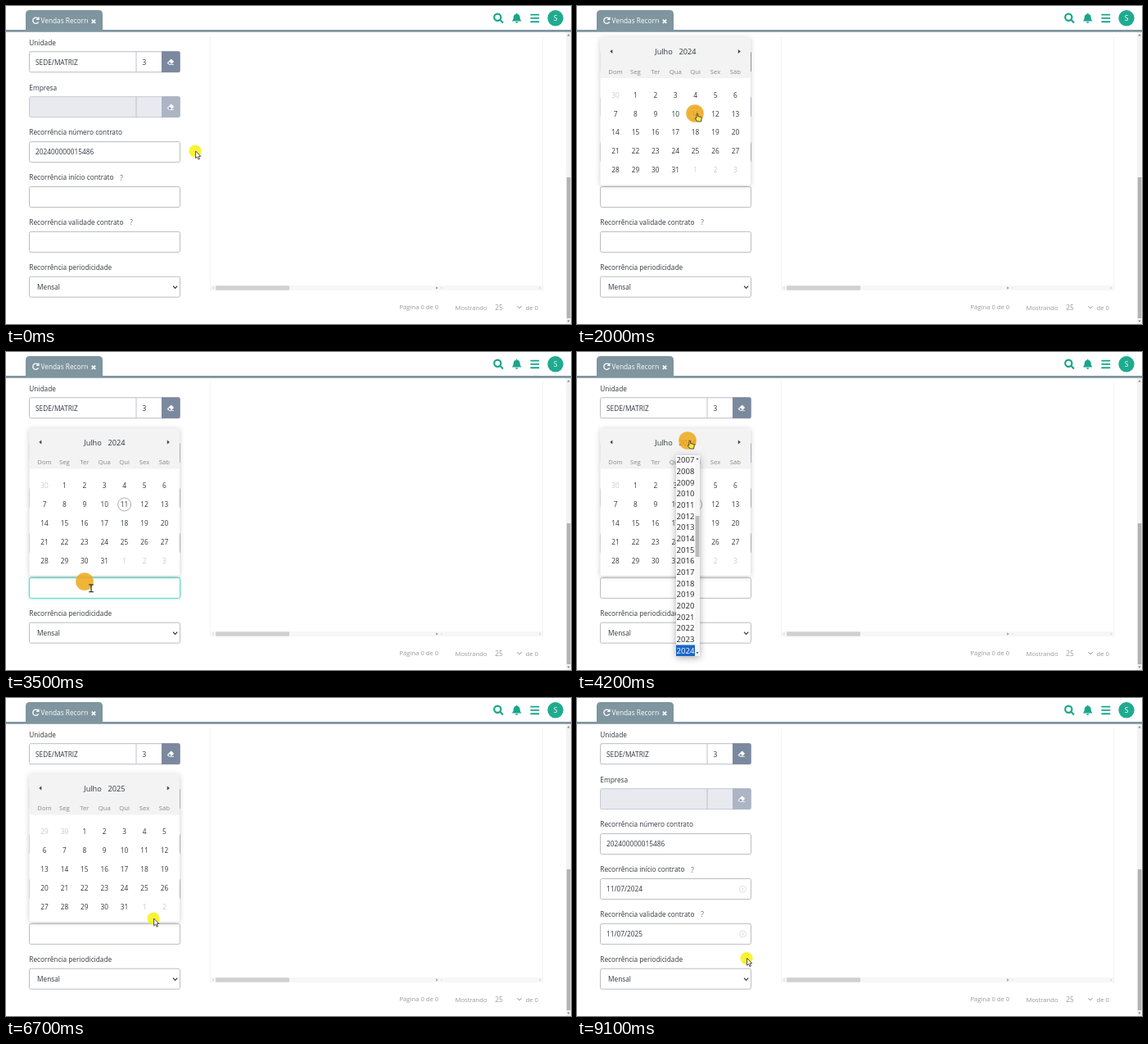
These frames come from a looping animation (690x388 px, 9.4 s). An HTML page:

```html
<!DOCTYPE html>
<html lang="pt-BR">
<head>
<meta charset="utf-8">
<title>Vendas Recorrentes</title>
<style>
  html, body { margin: 0; width: 100%; height: 100%; overflow: hidden; background: #fff; }
  svg { display: block; width: 690px; height: 388px; }
  text { font: 8.3px "Open Sans", "Noto Sans", sans-serif; fill: #33373d; }
  .mid { text-anchor: middle; }
  .box { fill: #fff; stroke: #b4b6bb; }
  .off { fill: #e9eaf0; stroke: #c0c4cd; }
  .focus { stroke: #52d6c0; filter: drop-shadow(0 0 1.5px #7fe3d2); }
  .pager text { font-size: 7.65px; fill: #999; }
  .title { font-size: 9.2px; }
  .week { font-size: 7.7px; fill: #888; }
  .dim { fill: #c9c9c9; }
  .popup { filter: drop-shadow(0 1px 3px #0003); }
  .list { filter: drop-shadow(0 2px 4px #0005); }
  .list text { font-size: 9.6px; fill: #222; }
  .list .hot { fill: #fff; }
  .teal { fill: none; stroke: #1aa68a; stroke-width: 2.2; }
</style>
</head>
<body>
<svg viewBox="0 0 690 388">
  <defs>
    <clipPath id="tabClip"><path d="M40 5H100V29H40Z"/></clipPath>
    <clipPath id="listClip"><path d="M121 126H150V371H121Z"/></clipPath>
    <g id="eraser">
      <path d="M-4 1 0-3.2Q.6-3.7 1.2-3.2L3.6-1Q4.1-.4 3.6.2L1 2.7H4V3.5H-1.7L-4 1.8Q-4.4 1.4-4 1Z" fill="#fff"/>
      <path d="M-2.8 1.2-1.4-.2.8 1.9-.1 2.7H-1.4Z" fill="#8493a9"/>
    </g>
    <g id="clear" fill="none" stroke="#d3d3d3" stroke-width=".7">
      <circle r="4"/><path d="M-1.3-1.3 1.3 1.3M1.3-1.3-1.3 1.3"/>
    </g>
  </defs>

  <path d="M24 30V10Q24 5 29 5H113Q118 5 118 10V30Z" fill="#7f959f"/>
  <path d="M0 28.9H690V31.7H0Z" fill="#7f959f"/>
  <path d="M39.3 15.6A3.6 3.6 0 1 0 39.7 19.2M39.9 13.4V16.3H37" fill="none" stroke="#fff" stroke-width="1.3"/>
  <g clip-path="url(#tabClip)"><text x="42.5" y="21" style="fill:#fff">Vendas Recorrentes</text></g>
  <path d="M104.8 16.6 109.2 21M109.2 16.6 104.8 21" stroke="#fff" stroke-width="1.7"/>

  <circle class="teal" cx="600.3" cy="13.8" r="4.1"/>
  <path class="teal" d="M603.3 16.8 607 20.5"/>
  <path d="M618 18.4Q619.8 16.8 619.8 13.4 620 10.4 623 9.8V8.8H624.4V9.8Q627.4 10.4 627.6 13.4 627.6 16.8 629.4 18.4ZM622 19.2H625.4Q625 20.9 623.7 20.9 622.4 20.9 622 19.2Z" fill="#1aa68a"/>
  <path class="teal" style="stroke-width:1.9" d="M640.4 10.6H651.2M640.4 14.9H651.2M640.4 19.2H651.2"/>
  <circle cx="671" cy="14.8" r="9.7" fill="#1fab8f"/>
  <text class="mid" x="671" y="18" style="fill:#fff;font-size:8.6px">S</text>

  <path d="M249.5 37V348M655.5 37V348" stroke="#f4f4f4"/>
  <path d="M250 341H655V347H250Z" fill="#f7f7f7"/>
  <rect x="256" y="341.3" width="90" height="5.4" rx="1" fill="#d1d1d1"/>
  <path d="M525 342.3 528 344 525 345.7Z" fill="#aaa"/>
  <path d="M254 342.5 252 344 254 345.5M651 342.5 653 344 651 345.5M531 344H533" fill="none" stroke="#ccc" stroke-width=".7"/>
  <g class="pager">
    <text x="480.5" y="370">Página 0 de 0</text>
    <text x="548.5" y="370.7">Mostrando</text>
    <text x="597.3" y="370.5" style="font-size:8.3px">25</text>
    <text x="634.5" y="370.7">de 0</text>
    <path d="M624.5 366.3 627 368.8 629.5 366.3" fill="none" stroke="#888"/>
  </g>
  <path d="M684 32H690V388H684Z" fill="#f3f3f3"/>
  <path d="M684.8 209H689.4V381H684.8Z" fill="#b3b3b3"/>
  <path d="M685.3 36.5 687 34 688.7 36.5ZM685.3 383.5 687 386 688.7 383.5Z" fill="#888"/>

  <g id="form"></g>
  <g id="popup" class="popup"></g>

  <g id="list" class="list">
    <path d="M121 126H150V371H121Z" fill="#fff"/>
    <g clip-path="url(#listClip)"><g id="years"></g></g>
    <path d="M144 126H150V371H144Z" fill="#f6f6f6"/>
    <rect id="thumb" x="144.5" width="5" y="200" height="50" fill="#bcbcbc"/>
    <path d="M145.4 131.3 147 129 148.6 131.3ZM145.4 366 147 368.3 148.6 366Z" fill="#555"/>
  </g>

  <g id="pointer">
    <circle id="halo"/>
    <path id="arrow" d="M.6 0V8.8L2.6 7 4 10.2 5.5 9.5 4.1 6.4H6.8Z" fill="#fff" stroke="#222" stroke-width=".8"/>
    <path id="beam" d="M5.2 3.8H7.3L8 4.5 8.7 3.8H10.8M8 4.5V12M5.2 12.7H7.3L8 12 8.7 12.7H10.8" fill="none" stroke="#2d3a2b" stroke-width="1.3"/>
    <path id="hand" d="M2 .4Q3-.4 3.6.8V3.6L7.4 4.4Q8.4 4.7 8.2 6L7.6 10H3L.2 6.4Q0 5.4 1.8 6Z" fill="#f7e74a" stroke="#222" stroke-width=".8"/>
  </g>
</svg>
<script>
const LOOP = 9400, STEP = 100, ROW = 13.68, FIRST_YEAR = 1995;
const $ = id => document.getElementById(id);
const text = (x, y, s, cls = '') => `<text x="${x}" y="${y}" class="${cls}">${s}</text>`;
const box = (x, y, w, cls = 'box', id = '') =>
  `<rect id="${id}" class="${cls}" x="${x}" y="${y}" width="${w}" height="25" rx="2" stroke-width=".9"/>`;

// Form
const help = (x, y) => `<text x="${x}" y="${y}" class="mid" style="fill:#666">?</text>`;
const lookup = (y, cls, fill) => box(28.5, y, 184, cls) +
  `<path d="M159 ${y}v25" stroke="#b9bcc4" stroke-width=".9"/>
   <path d="M190 ${y - .4}h20.5q2 0 2 2v21.8q0 2-2 2h-20.5z" fill="${fill}"/>
   <use href="#eraser" x="201" y="${y + 12.5}"/>`;
const dateField = (n, y, value) => box(28.5, y, 184, 'box', 'field' + n) +
  `<path id="caret${n}" d="M36 ${y + 7.5}v10" stroke="#333" stroke-width=".8"/>
   <g id="value${n}">${text(36, y + 15.9, value)}<use href="#clear" x="202.5" y="${y + 12.6}"/></g>`;

$('form').innerHTML =
  ['Unidade', 'Empresa', 'Recorrência número contrato', 'Recorrência início contrato',
   'Recorrência validade contrato', 'Recorrência periodicidade']
    .map((s, i) => text(28.3, 47.6 + i * 54.9, s)).join('') +
  help(141, 212.5) + help(153, 267.4) +
  lookup(55.7, 'box', '#7b899f') + text(36, 71.5, 'SEDE/MATRIZ') + text(166.5, 71.5, '3') +
  lookup(110.7, 'off', '#adb5c4') +
  box(28.5, 165.6, 184) + text(36, 181.4, '202400000015486') +
  dateField(1, 220.5, '11/07/2024') +
  dateField(2, 275.4, '11/07/2025') +
  box(28.5, 330.2, 184) + text(38, 346, 'Mensal') +
  '<path d="M204 341.7 206.6 344.3 209.2 341.7" fill="none" stroke="#333" stroke-width="1.2"/>';

// Calendar, laid out in the upper of its two places
const col = i => 47 + i * 24.4;
function days(year) {
  const lead = new Date(year, 6, 1).getDay();
  return Array.from({ length: 35 }, (_, i) => {
    const d = new Date(year, 6, 1 - lead + i);
    return text(col(i % 7), 111.6 + (i / 7 | 0) * 22.9, d.getDate(), d.getMonth() === 6 ? 'mid' : 'mid dim');
  }).join('');
}
$('popup').innerHTML =
  `<rect x="28.5" y="38.5" width="183.5" height="180" rx="2.5" fill="#fff"/>
   <path d="M28.5 88V41q0-2.5 2.5-2.5h178.500q2.500 0 2.500 2.500v47z" fill="#f3f3f3"/>
   <path d="M43.300 53v5l-3-2.500zM196.800 53v5l3-2.500z" fill="#444"/>` +
  text(106, 59.4, 'Julho', 'mid title') +
  '<text id="year" x="135" y="59.4" class="mid title"></text>' +
  ['Dom', 'Seg', 'Ter', 'Qua', 'Qui', 'Sex', 'Sáb'].map((s, i) => text(col(i), 82.8, s, 'mid week')).join('') +
  `<g id="days2024"><circle cx="144.6" cy="131.5" r="8" fill="none" stroke="#999" stroke-width=".8"/>${days(2024)}</g>
   <g id="days2025">${days(2025)}</g>`;

// Year list
$('years').innerHTML = '<rect id="bar" x="121" width="23" height="13.68" fill="#1a67c9"/>' +
  Array.from({ length: 40 }, (_, i) => text(121.5, (i * ROW + 3.5).toFixed(2), FIRST_YEAR + i)).join('');
const yearTexts = $('years').querySelectorAll('text');

// Tracks: [time, values...]
const path = [[0, 231, 177], [100, 104, 244], [300, 96, 226], [1300, 96, 226], [1800, 144, 131],
  [2200, 144, 131], [2600, 96, 280], [3700, 96, 280], [4000, 135, 108], [4400, 135, 108],
  [5300, 134, 327], [5700, 134, 327], [6500, 180, 269], [7000, 180, 269], [7300, 146, 222],
  [7600, 150, 190], [7800, 169, 187], [8300, 169, 187], [8800, 207, 317.500], [LOOP, 207, 317.500]];
const scroll = [[0, 131.7], [4500, 131.7], [5300, 134.1], [5400, 80], [LOOP, 80]];
const presses = [[300, 1400], [2000, 2300], [2800, 3800], [4000, 4500], [5400, 5700], [8100, 8400]];
const shapes = [[0, 'arrow'], [100, 'beam'], [1400, 'arrow'], [1500, 'hand'], [2300, 'arrow'],
  [2500, 'beam'], [3800, 'arrow'], [4000, 'hand'], [5800, 'arrow'], [7200, 'hand'], [8400, 'arrow']];
const openings = [{ from: 300, to: 2000, dy: 0 }, { from: 2800, to: 8100, dy: 54.5 }];

const clamp = v => Math.max(0, Math.min(1, v));
const within = (t, a, b) => t >= a && t < b;
const show = (id, on) => $(id).style.display = on ? '' : 'none';

function at(track, t) {
  const i = Math.max(1, track.findIndex(k => k[0] > t));
  const a = track[i - 1], b = track[i];
  const p = clamp((t - a[0]) / (b[0] - a[0])), e = p * p * (3 - 2 * p);
  return a.slice(1).map((v, j) => v + (b[j + 1] - v) * e);
}

function drawPopup(t) {
  const o = openings.find(o => within(t, o.from, o.to + 200));
  const p = o ? Math.min(clamp((t - o.from) / 300), clamp((o.to + 200 - t) / 200)) : 0;
  show('popup', p > 0);
  if (!p) return;
  const s = .5 + p / 2;
  $('popup').setAttribute('transform', `translate(28 ${218.5 + o.dy}) scale(${s}) translate(-28 -218.5)`);
  $('popup').style.opacity = p;
  $('year').textContent = t < 5500 ? 2024 : 2025;
  show('days2024', t < 5800);
  show('days2025', t >= 5800);
}

function drawList(t, y) {
  const on = within(t, 4100, 5500);
  show('list', on);
  if (!on) return;
  const [top] = at(scroll, t);
  const origin = top - (2007 - FIRST_YEAR) * ROW;
  const hot = y > 126 ? Math.round((y - origin) / ROW) : 2024 - FIRST_YEAR;
  $('years').setAttribute('transform', `translate(0 ${origin})`);
  $('bar').setAttribute('y', (hot - .5) * ROW);
  yearTexts.forEach((el, i) => el.classList.toggle('hot', i === hot));
  $('thumb').setAttribute('y', 200 - (top - 131.7) * .2);
}

function drawField(n, t, focusFrom, focusTo, filledAt) {
  const focused = within(t, focusFrom, focusTo);
  $('field' + n).classList.toggle('focus', within(t, focusFrom + 200, focusTo));
  show('caret' + n, focused && Math.floor(t / 530) % 2);
  show('value' + n, t >= filledAt);
}

function drawPointer(t, x, y) {
  const pressed = presses.some(([a, b]) => within(t, a, b));
  const shape = shapes.filter(s => s[0] <= t).pop()[1];
  $('pointer').setAttribute('transform', `translate(${x} ${y})`);
  $('halo').setAttribute('r', pressed ? 10.8 : 7.6);
  $('halo').setAttribute('fill', pressed ? '#efa91cdd' : '#f7f000cc');
  ['arrow', 'beam', 'hand'].forEach(s => show(s, s === shape));
}

function frame(now) {
  const t = Math.floor(now % LOOP / STEP) * STEP;
  const [x, y] = at(path, t);
  drawField(1, t, 300, 2000, 2100);
  drawField(2, t, 2800, 4100, 8200);
  drawPopup(t);
  drawList(t, y);
  drawPointer(t, x, y);
  requestAnimationFrame(loop);
}
let start;
function loop(now) {
  start ??= now;
  frame(now - start);
}
frame(0);
</script>
</body>
</html>
```
